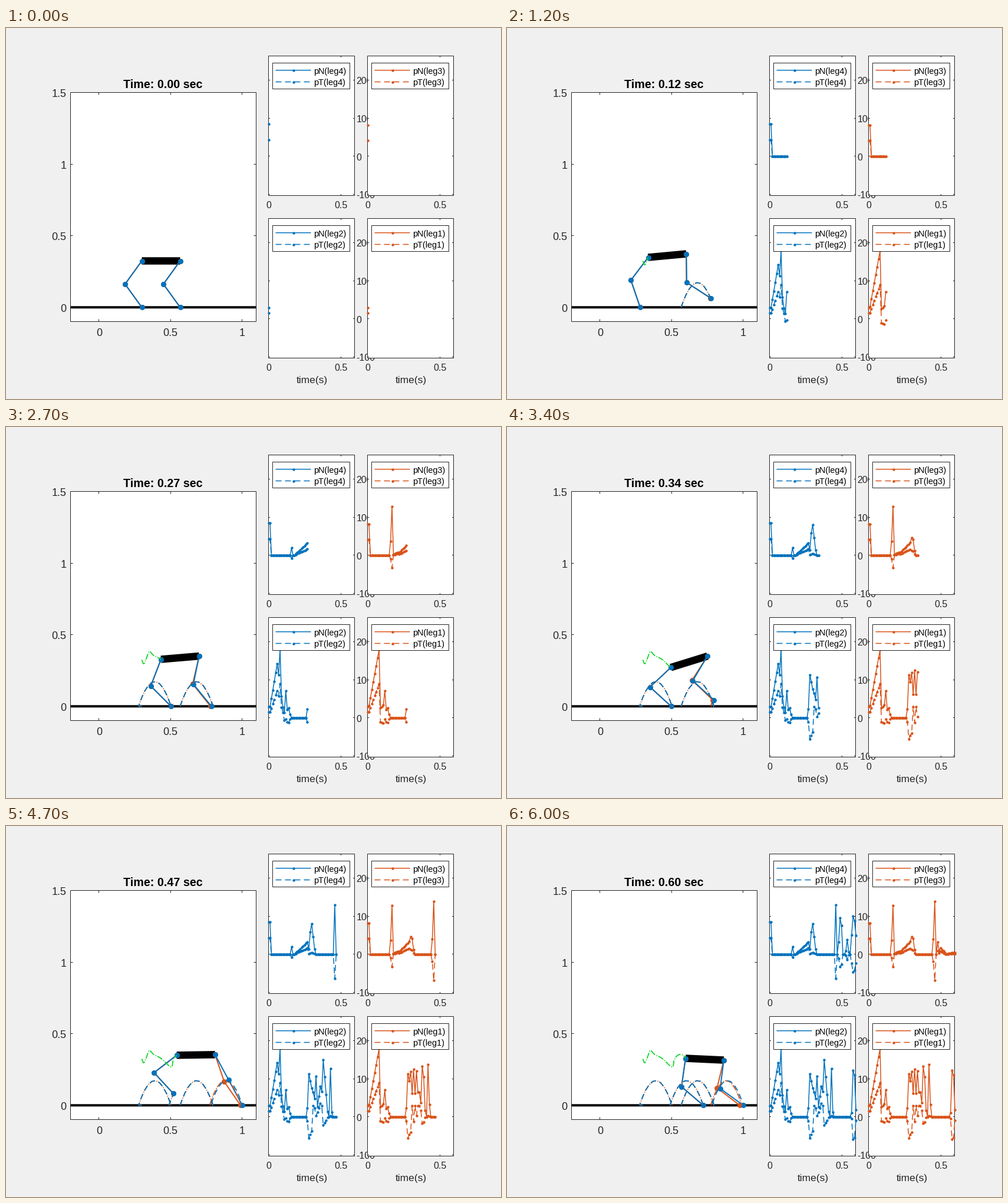
These frames come from a looping animation (840 by 630 pixels, 6100 ms). A matplotlib script:

```python
import numpy as np
import matplotlib.pyplot as plt
from matplotlib.animation import FuncAnimation
from matplotlib.patches import Rectangle

W, H, DPI = 840, 630, 100
PX = 72 / DPI
STEPS = 61
BLUE, ORANGE, GREEN, INK = "#0072bd", "#d95319", "#12d628", "#262626"

plt.rcParams["font.family"] = "Liberation Sans"
plt.rcParams["lines.scale_dashes"] = False
plt.rcParams["path.snap"] = False

fig = plt.figure(figsize=(W / DPI, H / DPI), dpi=DPI, facecolor="#f0f0f0")
ax = fig.add_axes([0, 0, 1, 1])
ax.set_xlim(0, W)
ax.set_ylim(H, 0)
ax.axis("off")


def crisp(v):
    return np.floor(v) + .5


def line(x, y, color, width, z, dash=None, dot=0):
    style = "-" if dash is None else (0, [d * PX for d in dash])
    art, = ax.plot(x, y, color=color, lw=width * PX, ls=style, zorder=z,
                   marker="o" if dot else None, ms=dot * PX, mew=0,
                   dash_capstyle="butt", solid_capstyle="butt")
    return art


def label(x, y, s, size, z, ha="center", color=INK, **kw):
    return ax.text(x, y, s, size=size * PX, ha=ha, va="baseline",
                   color=color, zorder=z, **kw)


def box(x0, y0, w, h, z, edge_z):
    ax.add_patch(Rectangle((x0, y0), w, h, fc="white", ec="none", zorder=z))
    ax.add_patch(Rectangle((x0, y0), w, h, fill=False, ec=INK, lw=PX, zorder=edge_z))


def plot_box(x0, y0, w, h, z, xticks, yticks, tick):
    box(x0, y0, w, h, z, z + 1)
    for x in crisp(np.array(xticks)):
        for y, d in ((y0, tick), (y0 + h, -tick)):
            line([x, x], [y, y + d], INK, 1, z + 1)
    for y in crisp(np.array(yticks)):
        for x, d in ((x0, tick), (x0 + w, -tick)):
            line([x, x + d], [y, y], INK, 1, z + 1)


# ---- walking robot ----

GROUND, LINK, BODY = 474.3, 48.6, 65
SWING, LIFT = 0.125, 42

# time, rear hip x, rear hip y, front hip offset in y
POSES = np.array([
    [0, 230.5, 395.5, 0],
    [.06, 234, 402, -3],
    [.12, 239.5, 389.5, -6],
    [.15, 242.5, 381.5, -6.5],
    [.20, 250, 387.5, -7],
    [.27, 263, 394.5, -5.5],
    [.36, 281, 409, -20],
    [.42, 284, 396.5, -6],
    [.48, 291, 388.5, 0],
    [.53, 298, 388.5, 6.5],
    [.60, 303, 394.5, 3],
])
POSE_T, POSE_V = POSES[:, 0], POSES[:, 1:]
POSE_SLOPE = np.gradient(POSE_V, POSE_T, axis=0)


def hips(t):
    """Rear and front hip on a cubic Hermite curve through the poses."""
    i = min(np.searchsorted(POSE_T, t, "right") - 1, len(POSE_T) - 2)
    h = POSE_T[i + 1] - POSE_T[i]
    u = (t - POSE_T[i]) / h
    s = u * u * (3 - 2 * u)
    x, y, rise = (POSE_V[i] * (1 - s) + POSE_V[i + 1] * s
                  + h * u * (1 - u) * ((1 - u) * POSE_SLOPE[i] - u * POSE_SLOPE[i + 1]))
    return np.array([[x, y], [x + np.sqrt(BODY ** 2 - rise ** 2), y + rise]])


def walker(lifts, xs):
    """Foot path: xs are the start, each lift-off and touchdown, and the end."""
    a, b = lifts
    times = [0, a, a + SWING, b, b + SWING, .6]

    def at(t):
        for start in lifts:
            u = (t - start) / SWING
            if 0 < u < 1:
                s = u * u * (3 - 2 * u)
                x0, x1 = np.interp([start, start + SWING], times, xs)
                return np.array([x0 + (x1 - x0) * s, GROUND - 4 * LIFT * s * (1 - s)])
        return np.array([np.interp(t, times, xs), GROUND])
    return at


def leg(hip, toe):
    d = toe - hip
    dist = np.hypot(*d)
    bend = np.sqrt(max(LINK ** 2 - dist ** 2 / 4, 0))
    knee = (hip + toe) / 2 + np.array([-d[1], d[0]]) / dist * bend
    return np.array([hip, knee, toe]).T


rear = walker((.145, .441), [230.5, 225, 280, 276.5, 333, 333])
front = walker((.02, .32), [295.5, 295.5, 351.5, 347.5, 401, 401])
front_far = walker((.02, .32), [295.5, 295.5, 351, 345.5, 398.5, 395])
LEGS = [(0, rear, ORANGE), (1, front_far, ORANGE), (0, rear, BLUE), (1, front, BLUE)]
DASH, DASH_DOT = (10, 6), (10, 2.5, 1.5, 2)


def main_x(v):
    return 157.9 + 242.3 * v


def main_y(v):
    return 474.2 - 243.1 * v


HALVES = np.array([0, .5, 1])
plot_box(109.5, 109.5, 315, 389, 1, main_x(HALVES), main_y(HALVES), 4)
for v in (0, .5, 1, 1.5):
    label(102.5, main_y(v) + 7.8, f"{v:g}", 18, 3, ha="right")
    if v <= 1:
        label(main_x(v), 523, f"{v:g}", 18, 3)
title = label(266.5, 102, "", 19.8, 3, color="black", weight="bold")

line([109.5, 425], [GROUND, GROUND], "black", 4, 3)
body = line([], [], "black", 12.5, 4)
leg_lines = [line([], [], c, 2, 5 + i * .1, dot=9) for i, (*_, c) in enumerate(LEGS)]
foot_trails = [line([], [], c, 1.8, 6 + i * .1, dash=DASH if c == BLUE else DASH_DOT)
               for i, (*_, c) in enumerate(LEGS)]
hip_trail = line([], [], GREEN, 1.8, 7, dash=DASH_DOT)


# ---- contact force plots ----

def peak(centre, height, grip, rise=1, fall=1):
    """Triangular contact pulse; grip is tangential over normal force."""
    d = np.arange(STEPS) - centre
    return height * np.clip(1 - np.where(d < 0, -d / rise, d / fall), 0, None), grip


def forces(peaks):
    """The strongest pulse at each step sets both force components."""
    pulses = np.array([p for p, _ in peaks])
    grips = np.array([g for _, g in peaks])
    normal = pulses.max(axis=0)
    return normal, normal * grips[pulses.argmax(axis=0)]


# Front legs: stance, touchdown impact, load ramp, push-off, second touchdown.
leg4 = [peak(.5, 170, .5), peak(16, 19, -.45), peak(27, 32, .5, 9),
        peak(29.7, 90, .05, 2, 2.7), peak(46, 130, -.49), peak(49.4, 120, -.35, 1.9, 1.6),
        peak(54, 38, -.37, 1.3, 1.2), peak(58.3, 115, -.47, 2.3, 3)]
leg3 = [peak(.5, 164, .5), peak(17, 128, -.26, 1.4), peak(21, 8, .5, 4, 4),
        peak(29, 33, .45, 9, 2), peak(30.4, 58, .27, 2, 2), peak(46, 139, -.49, 1.4),
        peak(48, 32, .3), peak(50, 17, .4, 2, 4), peak(59, 5, .2, 6, 4)]

# Rear legs share the stance, landing and final impact.
shared = [peak(.5, 58, .5), peak(12, 71, -.05, 1, 1.2), peak(14, 26, -.48, 6, 1.5),
          peak(28, 113, -.49, 1.25, 6), peak(58.4, 165, -.49, 1.5, 1.8)]
leg2 = shared + [
    peak(6, 141, .5, 6.2, 5), peak(8, 178, .5), peak(9, 30, -.45),
    peak(31, 64, .46, 2, 4), peak(33, 106, .02, 1.6, 1.3), peak(36, 80, .44, 3, 6),
    peak(38, 150, -.15, 1.5, 3.3), peak(43, 127, .02, 1, 1.1)]
leg1 = shared + [
    peak(8, 178, .5, 8.5), peak(11, 33, -.42, 9, 2), peak(30, 118, -.34, 1.5, 2),
    peak(31, 62, .48), peak(32, 125, -.1, 1.3, 1.5), peak(33, 62, .48),
    peak(34, 120, .02, 1.3, 2), peak(35.4, 80, .46, 2, 3),
    peak(38.3, 165, -.13, 1.5, 1.9), peak(42, 137, .02, 1, 1.3)]

STEP_PX, FORCE_PX = 2.443, 0.648
curves = []


def force_panel(col, row, color, name, peaks):
    dx, dy, z = 168 * col, 276 * row, 10 + 10 * col
    x0, zero = 445.5 + dx, 217.8 + dy
    levels = np.array([-100, 0, 100, 200])
    plot_box(x0, 47.5 + dy, 146, 237, z, [568 + dx], zero - FORCE_PX * levels, 2.5)
    box(452.5 + dx, 59.5 + dy, 131, 44, z + 3, z + 3)

    xs = x0 + STEP_PX * np.arange(STEPS)
    rows = ((71.7, "pN", None), (91.5, "pT", DASH))
    for (y, kind, dash), force in zip(rows, forces(peaks)):
        art = line([], [], color, 1.5, z + 2, dash=dash, dot=4.4)
        curves.append((art, xs, zero - FORCE_PX * force))
        line([457.5 + dx, 517.5 + dx], [y + dy] * 2, color, 1.5, z + 4, dash=dash)
        line([488 + dx], [y + dy], color, 1.5, z + 4, dot=4.4)
        label(522 + dx, y + 6 + dy, f"{kind}({name})", 14.4, z + 4, ha="left", color="black")

    for x, s in ((445.5, "0"), (568, "0.5")):
        label(x + dx, 305.5 + dy, s, 16, z + 4)
    if col == 0:
        for v in levels:
            label(594.3, zero - FORCE_PX * v + 6.8, f"{v}", 16, z + 4, ha="left")
    if row == 1:
        label(519 + dx, 603, "time(s)", 17.4, z + 4)


# The right column is painted last, so it covers part of the left one's labels.
force_panel(0, 0, BLUE, "leg4", leg4)
force_panel(0, 1, BLUE, "leg2", leg2)
force_panel(1, 0, ORANGE, "leg3", leg3)
force_panel(1, 1, ORANGE, "leg1", leg1)


def draw(k):
    t = k / 100
    past = np.arange(k + 1) / 100
    title.set_text(f"Time: {t:.2f} sec")
    ends = hips(t)
    body.set_data(*ends.T)
    for art, trail, (end, foot, _) in zip(leg_lines, foot_trails, LEGS):
        art.set_data(*leg(ends[end], foot(t)))
        trail.set_data(*np.array([foot(p) for p in past]).T)
    hip_trail.set_data(*np.array([hips(p)[0] for p in past]).T)
    for art, xs, ys in curves:
        art.set_data(xs[:k + 1], ys[:k + 1])
    return []


anim = FuncAnimation(fig, draw, frames=STEPS, interval=100, init_func=lambda: [],
                     repeat=True, repeat_delay=0, blit=False)
plt.show()
```
